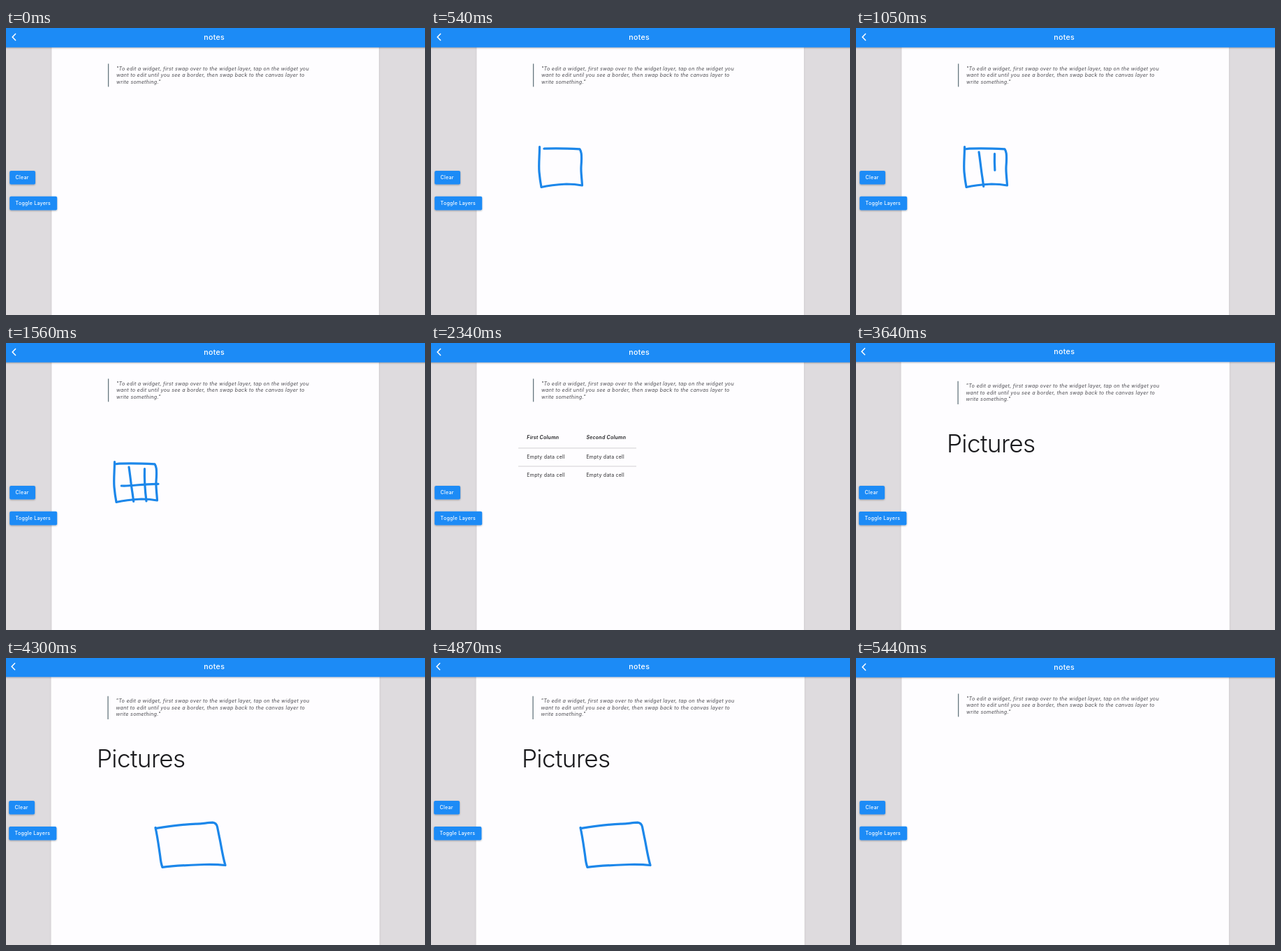
Animation, 600 px wide and 412 px high, one loop 5470 ms. Source, as an HTML page:

```html
<!DOCTYPE html>
<html lang="en">
<head>
<meta charset="utf-8">
<title>notes</title>
<style>
  html, body { margin: 0; width: 100%; height: 100%; overflow: hidden; background: #dedbde; }
  svg { display: block; width: 600px; height: 412px; }
  text { font-family: Inter, Roboto, sans-serif; font-size: 7px; letter-spacing: .25px; fill: #2b2b2e; }
  .title { font-size: 10.7px; font-weight: 500; letter-spacing: .3px; fill: #fff; text-anchor: middle; }
  .label { font-weight: 500; letter-spacing: .27px; fill: #fff; }
  .quote text { font-size: 7.2px; font-style: italic; letter-spacing: .27px; fill: #4b4b50; }
  .head { font-weight: 600; font-style: italic; fill: #1d1d20; }
  .heading { font-size: 35px; font-weight: 300; letter-spacing: -.6px; fill: #1a1a1d; }
  .blue { fill: #1e8bf6; }
  .rule { stroke: #c6c5c8; stroke-width: .8; }
  .ink { fill: none; stroke: #1c87ea; stroke-width: 3.2; stroke-linecap: round; stroke-linejoin: round; stroke-dasharray: 1 2; }
</style>
</head>
<body>
<svg viewBox="0 0 600 412">
  <defs>
    <filter id="soft" x="-20%" y="-20%" width="140%" height="150%">
      <feDropShadow dx="0" dy=".8" stdDeviation=".8" flood-color="#000" flood-opacity=".35"/>
    </filter>
    <filter id="edge" x="-5%" y="-5%" width="110%" height="110%">
      <feDropShadow dx="0" dy="1" stdDeviation="1.5" flood-color="#000" flood-opacity=".1"/>
    </filter>
  </defs>
  <g id="view">
    <rect x="-5" y="-5" width="610" height="422" fill="#dedbde"/>
    <rect x="65.5" y="20" width="468.5" height="410" fill="#fefdff" filter="url(#edge)"/>

    <g id="quote" class="quote">
      <path d="M146.6 51.3V84.4" stroke="#66777f" stroke-width="1.3"/>
      <text x="158" y="61">"To edit a widget, first swap over to the widget layer, tap on the widget you</text>
      <text x="158" y="70.3">want to edit until you see a border, then swap back to the canvas layer to</text>
      <text x="158" y="79.6">write something."</text>
    </g>

    <g id="table">
      <text class="head" x="137.3" y="137.7">First Column</text>
      <text class="head" x="222.4" y="137.7">Second Column</text>
      <path class="rule" d="M125 150.9H294M125 177H294"/>
      <text x="137.3" y="165.7">Empty data cell</text>
      <text x="222.4" y="165.7">Empty data cell</text>
      <text x="137.3" y="191.8">Empty data cell</text>
      <text x="222.4" y="191.8">Empty data cell</text>
    </g>
    <text id="heading" class="heading" x="130.5" y="157">Pictures</text>
    <g id="inks"></g>

    <rect class="blue" x="-5" y="-5" width="610" height="32.8" filter="url(#soft)"/>
    <path d="M14 8L9.2 13L14 18" fill="none" stroke="#fff" stroke-width="1.5"/>
    <text class="title" x="298.2" y="16.7">notes</text>

    <rect class="blue" x="5.2" y="205" width="36.8" height="19.5" rx="2" filter="url(#soft)"/>
    <text class="label" x="13.6" y="217.2">Clear</text>
    <rect class="blue" x="5.2" y="241.8" width="68" height="19.6" rx="2" filter="url(#soft)"/>
    <text class="label" x="13.6" y="254">Toggle Layers</text>
  </g>
</svg>
<script>
const LOOP = 5470;
const TABLE_IN = 1830, CUT = 2520, HEADING_IN = 3430, END = 5150;

// Pen strokes: start, finish, removal, path
const STROKES = [
  [60, 555, TABLE_IN, "M155.5 170.5C155.5 182 154 197 155 207Q156 218 158 228.5C170 225.5 184 224.5 194 224Q206 224 216.5 226C216 216 214.5 207 215 199Q216 186 215.2 180Q214.5 176 213 173.8C197 173 178 172.5 162 173.2L155.5 174"],
  [660, 870, TABLE_IN, "M176 178C178 191 179 203 181 215L182.7 227.5"],
  [960, 1140, TABLE_IN, "M198.5 180.5C198 195 199 211 201 227"],
  [1260, 1470, TABLE_IN, "M165.3 205C179 206 194 202 218 202.3"],
  [2580, 3030, HEADING_IN, "M161.5 160Q164.5 162 164.3 165C165 185 166.5 208 170 225Q182 225.5 194.8 228.5C194 204 193.5 178 193.8 153Q176 154.5 161.5 159.2"],
  [3780, 4260, END, "M214.3 243.5C217 255 219 270 221 284Q222 294 224.2 300C242 297.5 262 297 284 296.2Q301 295.8 314 297.2C310 284 308 268 305.5 257Q303.5 247 302.5 242Q301 236.5 296 236C288 236 281 238.3 272 238Q246 239 214.5 244.5"]
];

const byId = id => document.getElementById(id);
const show = (el, on) => el.setAttribute("visibility", on ? "visible" : "hidden");

const inks = STROKES.map(([start, finish, gone, d]) => {
  const el = document.createElementNS("http://www.w3.org/2000/svg", "path");
  el.setAttribute("class", "ink");
  el.setAttribute("pathLength", 1);
  el.setAttribute("d", d);
  byId("inks").append(el);
  return { el, start, finish, gone };
});

function draw(t) {
  for (const { el, start, finish, gone } of inks) {
    const p = Math.min(1, (t - start) / (finish - start));
    show(el, p > 0 && t < gone);
    el.style.strokeDashoffset = 1 - Math.max(0, p);
  }
  show(byId("table"), t >= TABLE_IN && t < CUT);
  show(byId("heading"), t >= HEADING_IN && t < END);

  // The second take sits a little lower, then is slightly enlarged
  const lower = t >= CUT && t < END ? 4 : 0;
  const zoom = t >= HEADING_IN && t < END ? 1.0035 : 1;
  byId("quote").setAttribute("transform", `translate(0 ${lower})`);
  byId("view").setAttribute("transform", `translate(300 206) scale(${zoom}) translate(-300 -206)`);
}

function tick() {
  draw(performance.now() % LOOP);
  requestAnimationFrame(tick);
}
tick();
</script>
</body>
</html>
```
